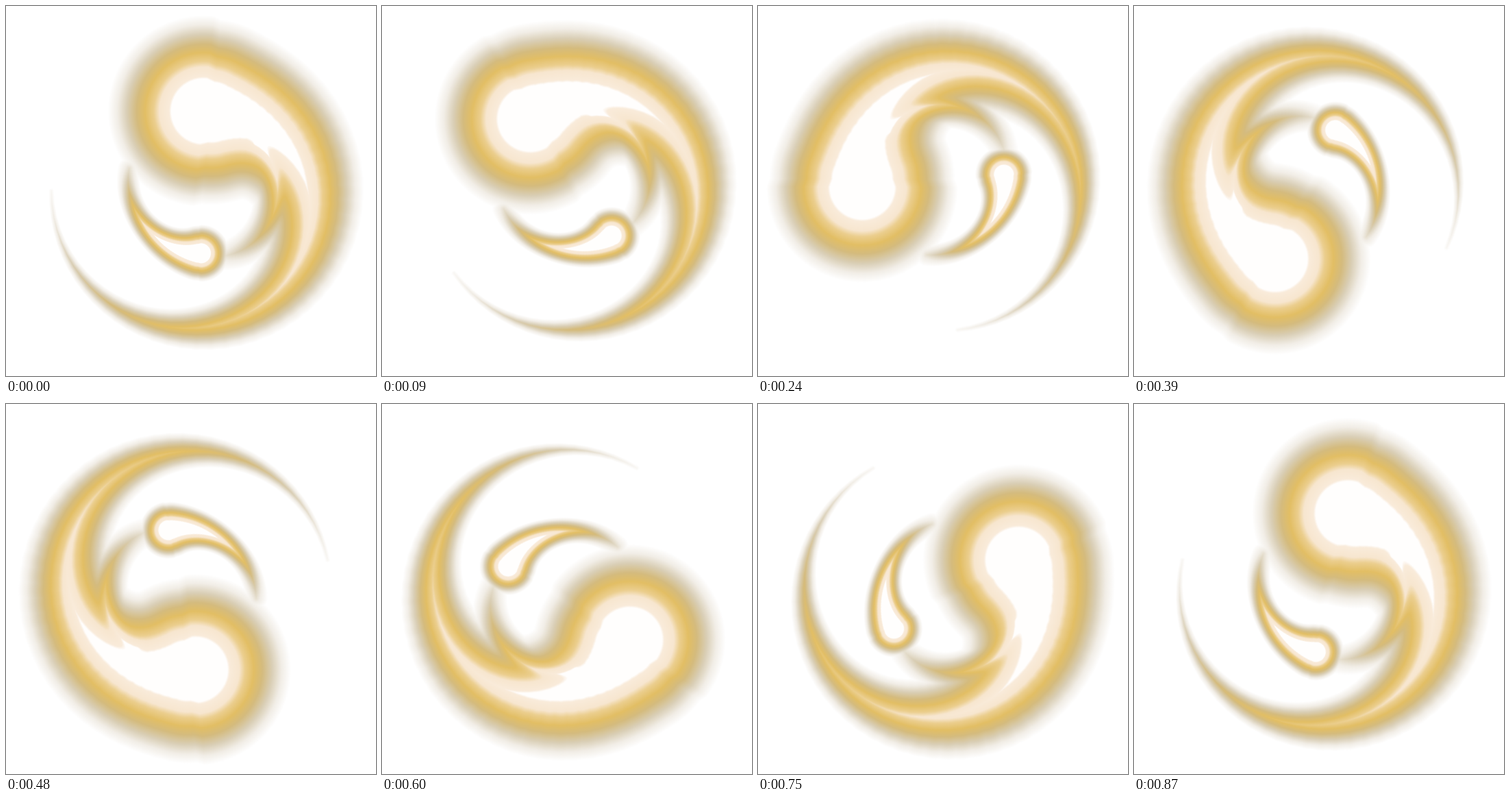
Recreate the animation shown at these times as an HTML page with a canvas. Size 540 px wide and 540 px high, loop 0.9 s.

```html
<!DOCTYPE html>
<html lang="en">
<head>
<meta charset="utf-8">
<title>Golden comet spinner</title>
<style>
  html, body { margin: 0; width: 100%; height: 100%; overflow: hidden; background: #fff; }
  canvas { display: block; width: 540px; height: 540px; }
</style>
</head>
<body>
<canvas id="swirl" width="540" height="540"></canvas>
<script>
const SIZE = 540, MID = SIZE / 2, STEPS = 48;
const canvas = document.getElementById('swirl');
const ctx = canvas.getContext('2d');

// Trails in polar form: angles in degrees, the rest as functions of u from head (0) to tip (1).
// reach is the glow's half width, power its brightness along the centre line.
const trails = [
  { // large comet
    from: -81, to: 180,
    radius: u => 118 + 86 * (1 - Math.exp(-((u / .32) ** 1.6))),
    reach: u => 4 + 136 * (1 - u) ** 1.5,
    power: u => 1 - .95 * u - .06 * Math.sin(2 * Math.PI * u)
  },
  { // inner prong
    from: -36, to: 70,
    radius: u => 122 + 30 * u - 50 * u * u,
    reach: u => 46 - 26 * u,
    power: u => .7 - .6 * u
  },
  { // small comet
    from: 81, to: 200,
    radius: u => 92 + 4 * u - 10 * Math.sin(Math.PI * u),
    reach: u => 17 + 25 * (1 - u) ** 2.5,
    power: u => 1 - .85 * u
  }
];

// Brightness, red, green, blue
const ramp = [
  [0, 255, 255, 255], [.1, 241, 237, 230], [.2, 217, 206, 181], [.3, 212, 187, 126],
  [.39, 226, 190, 100], [.48, 235, 206, 142], [.54, 247, 230, 207],
  [.64, 249, 235, 218], [.665, 255, 254, 253], [1, 255, 254, 253]
];

const lerp = (a, b, t) => a + (b - a) * t;
const clamp = t => Math.max(0, Math.min(1, t));

function pointOn(trail, u) {
  const angle = lerp(trail.from, trail.to, u) * Math.PI / 180;
  const r = trail.radius(u);
  return {
    x: MID + r * Math.cos(angle), y: MID + r * Math.sin(angle),
    reach: trail.reach(u), power: trail.power(u)
  };
}

// Brightest value of a tapering capsule between neighbouring points
function addSegment(field, a, b) {
  const dx = b.x - a.x, dy = b.y - a.y, len2 = dx * dx + dy * dy;
  const reach = Math.max(a.reach, b.reach);
  const low = (p, q) => Math.max(0, Math.floor(Math.min(p, q) - reach));
  const high = (p, q) => Math.min(SIZE - 1, Math.ceil(Math.max(p, q) + reach));
  const x0 = low(a.x, b.x), x1 = high(a.x, b.x);
  const y0 = low(a.y, b.y), y1 = high(a.y, b.y);
  for (let y = y0; y <= y1; y++) {
    for (let x = x0; x <= x1; x++) {
      const px = x + .5 - a.x, py = y + .5 - a.y;
      const t = clamp((px * dx + py * dy) / len2);
      const ex = px - t * dx, ey = py - t * dy;
      const fall = 1 - Math.sqrt(ex * ex + ey * ey) / lerp(a.reach, b.reach, t);
      const k = y * SIZE + x;
      field[k] = Math.max(field[k], lerp(a.power, b.power, t) * fall);
    }
  }
}

function glow(trail) {
  const field = new Float32Array(SIZE * SIZE);
  for (let i = 0; i < STEPS; i++) {
    addSegment(field, pointOn(trail, i / STEPS), pointOn(trail, (i + 1) / STEPS));
  }
  return field;
}

function shade(v) {
  const i = Math.max(1, ramp.findIndex(stop => v <= stop[0]));
  const a = ramp[i - 1], b = ramp[i];
  const t = (v - a[0]) / (b[0] - a[0]);
  return [1, 2, 3].map(k => lerp(a[k], b[k], t));
}

function paint() {
  const fields = trails.map(glow);
  const colours = Array.from({ length: 512 }, (_, i) => shade(i / 511));
  const image = ctx.createImageData(SIZE, SIZE);
  for (let k = 0; k < SIZE * SIZE; k++) {
    let sum = 0;
    for (const f of fields) sum += f[k] ** 8;
    const c = colours[Math.round(clamp(sum ** .125) * 511)];
    image.data.set([c[0], c[1], c[2], 255], k * 4);
  }
  ctx.putImageData(image, 0, 0);
}

paint();
canvas.animate(
  [{ transform: 'rotate(0deg)' }, { transform: 'rotate(-360deg)' }],
  { duration: 900, iterations: Infinity, easing: 'steps(30)' }
);
</script>
</body>
</html>
```
